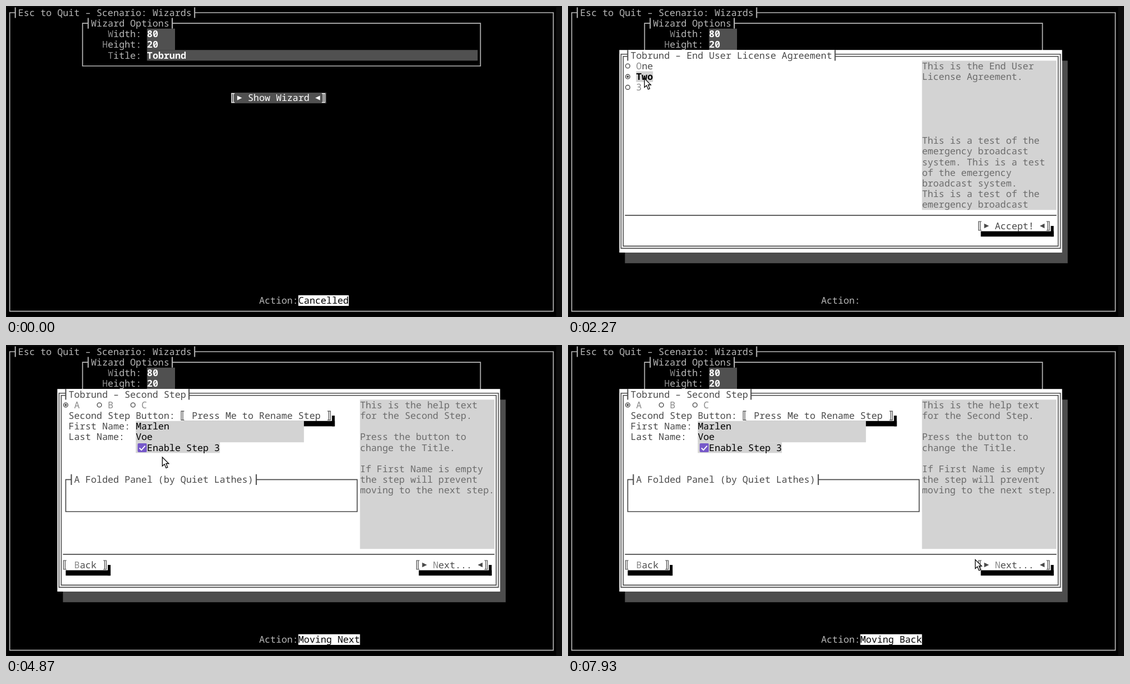
Write an HTML page that moves like this. It is 1000x560 px and loops after 8 s.

```html
<!DOCTYPE html>
<html lang="en">
<head>
<meta charset="utf-8">
<title>Wizards</title>
<style>
  html, body { margin: 0; width: 100%; height: 100%; overflow: hidden; background: #0c0c0c; }
  svg { display: block; width: 100%; height: 100%; }
  text {
    font: 500 16.8px "Noto Sans Mono", "DejaVu Sans Mono", monospace;
    white-space: pre;
    text-rendering: geometricPrecision;
    font-variant-ligatures: none;
  }
  .bold { font-weight: 700; }
</style>
</head>
<body>
<svg id="stage" viewBox="0 0 1000 560"></svg>
<script>
const LOOP = 8000, TICK = 1000 / 15;
const CELL_W = 10.08, CELL_H = 19.2;
const INK = '#4a4a4a', DIM = '#8a8a8a', PANEL = '#d3d3d3', LIGHT = '#b8b8b8', FIELD = '#505050';

// Character grid: left edge, top edge and centres of a cell.
const left = c => 1.6 + c * CELL_W;
const top_ = r => 2.4 + r * CELL_H;
const midX = c => left(c + 0.5);
const midY = r => top_(r + 0.5);

const box = (x1, y1, x2, y2, fill) =>
  `<rect x="${x1}" y="${y1}" width="${x2 - x1}" height="${y2 - y1}" fill="${fill}"/>`;
const cells = (c1, r1, c2, r2, fill) => box(left(c1), top_(r1), left(c2), top_(r2), fill);
const path = (d, color, width = 1.7) =>
  `<path d="${d}" fill="none" stroke="${color}" stroke-width="${width}"/>`;
const text = (c, r, s, color = INK, cls = '') =>
  `<text x="${left(c)}" y="${midY(r) + 5.8}" fill="${color}" class="${cls}">${s}</text>`;
const lines = (c, r, list, color) =>
  list.map((s, i) => s && text(c, r + i, s, color)).join('');

// Text whose hot key letter is dimmed.
const hot = (c, r, s, at = 0, color = INK, dim = DIM, cls = '') =>
  text(c, r, s.slice(0, at), color, cls) +
  text(c + at, r, s[at], dim) +
  text(c + at + 1, r, s.slice(at + 1), color, cls);

const focused = (c, r, s, cls) => cells(c, r, c + s.length, r + 1, PANEL) + text(c, r, s, '#000', cls);

function titleBars(c, r, title, color) {
  const bar = x => `M${midX(x)} ${top_(r)}v${CELL_H}`;
  return path(bar(c - 1) + bar(c + title.length), color, 2) + text(c, r, title, color);
}

function frame(c1, r1, c2, r2, title, color) {
  const t = c1 + 2;
  const d = `M${midX(t - 1)} ${midY(r1)}H${midX(c1)}V${midY(r2)}H${midX(c2)}V${midY(r1)}H${midX(t + title.length)}`;
  return path(d, color) + titleBars(t, r1, title, color);
}

function bracket(c, r, color, flip) {
  const x = left(c) + (flip ? 7.4 : 1), y = midY(r), s = flip ? -1 : 1;
  return path(`M${x + 5.4 * s} ${y - 8}H${x}V${y + 8}H${x + 5.4 * s}M${x + 3 * s} ${y - 8}V${y + 8}`, color, 1.2);
}

function arrow(c, r, color, flip) {
  const x = left(c) + (flip ? 8.8 : 1), y = midY(r), tip = flip ? x - 8.6 : x + 8.6;
  return `<path d="M${x} ${y - 4.2}V${y + 4.2}L${tip} ${y}Z" fill="${color}"/>`;
}

function button(c, r, label, { isDefault, pressed, color = INK, hotAt = 0, fill } = {}) {
  const pad = isDefault ? 3 : 2, end = c + label.length + 2 * pad;
  let out = '';
  if (pressed) {
    out += cells(c, r, end, r + 1, '#959595') + cells(c + pad, r, c + pad + 1, r + 1, '#c8c8c8');
  } else if (fill) {
    out += cells(c, r, end, r + 1, fill);
  } else {
    out += box(left(end), midY(r), left(end + 0.5), top_(r + 1.5), '#000') +
           box(left(c + 0.5), top_(r + 1), left(end + 0.5), top_(r + 1.5), '#000');
  }
  out += bracket(c, r, color) + bracket(end - 1, r, color, true);
  if (isDefault) out += arrow(c + 1, r, color) + arrow(end - 2, r, color, true);
  return out + (hotAt < 0 ? text(c + pad, r, label, color) : hot(c + pad, r, label, hotAt, color));
}

function radio(c, r, on) {
  const ring = `<circle cx="${midX(c)}" cy="${midY(r)}" r="3.9" fill="none" stroke="${INK}" stroke-width="1.4"/>`;
  return ring + (on ? `<circle cx="${midX(c)}" cy="${midY(r)}" r="2" fill="${INK}"/>` : '');
}

const action = s => cells(52, 27, 52 + s.length, 28, '#fff') + text(52, 27, s, '#000');
const dialogTitle = s =>
  box(midX(10), top_(4), midX(11 + s.length), top_(5), '#fff') + titleBars(11, 4, s, INK);
const help = (list, r = 5) => lines(63, r, list, '#6c6c6c');

const backdrop =
  cells(0, 0, 98, 29, '#000') +
  frame(0, 0, 97, 28, 'Esc to Quit – Scenario: Wizards', LIGHT) +
  frame(13, 1, 84, 5, 'Wizard Options', LIGHT) +
  hot(18, 2, 'Width:', 0, LIGHT) + hot(17, 3, 'Height:', 0, LIGHT) + hot(18, 4, 'Title:', 0, LIGHT) +
  cells(25, 2, 30, 4, FIELD) + cells(25, 4, 84, 5, FIELD) +
  text(25, 2, '80', '#fff', 'bold') + text(25, 3, '20', '#fff', 'bold') +
  text(25, 4, 'Tobrund', '#fff', 'bold') +
  text(45, 27, 'Action:', LIGHT);

const ring = d => {
  const x = midX(9) - d, y = midY(4) - d;
  return `M${x} ${y}H${midX(87) + d}V${midY(22) + d}H${x}Z`;
};
const dialog =
  cells(10, 5, 89, 24, '#4d4d4d') + cells(9, 4, 88, 23, '#fff') +
  path(ring(2) + ring(-2), INK, 1.6) +
  path(`M${left(10)} ${midY(19)}H${left(87)}`, INK) +
  cells(63, 5, 87, 19, PANEL);

const license =
  dialogTitle('Tobrund – End User License Agreement') +
  radio(10, 7) + text(12, 7, '3', DIM) +
  help(['This is the End User', 'License Agreement.']) +
  help(['This is a test of the', 'emergency broadcast', 'system. This is a test', 'of the emergency',
        'broadcast system.', 'This is a test of the', 'emergency broadcast'], 12);

const second =
  dialogTitle('Tobrund – Second Step') +
  radio(10, 5, true) + radio(16, 5) + radio(22, 5) +
  text(18, 5, 'B', DIM) + text(24, 5, 'C', DIM) +
  text(11, 6, 'Second Step Button:') + button(31, 6, 'Press Me to Rename Step', { hotAt: -1 }) +
  lines(11, 7, ['First Name:', 'Last Name:']) +
  cells(23, 7, 53, 9, PANEL) + lines(23, 7, ['Marlen', 'Voe'], '#000') +
  frame(10, 12, 62, 15, 'A Folded Panel (by Quiet Lathes)', INK) +
  help(['This is the help text', 'for the Second Step.', '', 'Press the button to', 'change the Title.', '',
        'If First Name is empty', 'the step will prevent', 'moving to the next step.']);

const bars = Array.from({ length: 16 }, (_, i) =>
  box(left(35 + i), top_(15), left(35 + i) + 6, top_(16), '#808080')).join('');
const third =
  dialogTitle('Tobrund – Third Step (Optional)') +
  text(10, 5, 'This step is optional.') +
  text(11, 15, 'Third Step ProgressBar:') + bars +
  help(['This is step is', 'optional', '(WizardStep.Enabled =', 'false). Enable it with', 'the checkbox in Step 2.']);

const emptyCheck = `<rect x="235.2" y="179.3" width="10.8" height="10.8" fill="none" stroke="${INK}" stroke-width="1.2"/>`;
const fullCheck = '<rect x="236.8" y="177" width="16.4" height="16" rx="2" fill="#7658c9"/>' +
  path('M240 185.5l3.6 3.6 6.6-7.4', '#fff', 1.9);
const enable = 'Enable Step 3';
const showOpts = { isDefault: true, color: '#fff', hotAt: -1, fill: FIELD };
const next = { isDefault: true };
const down = { pressed: true };
const defaultDown = { isDefault: true, pressed: true };

// Markup followed by the [from, to) spans in which it is on screen, in paint order.
const parts = [
  [backdrop, [0, LOOP]],
  [action('Cancelled'), [0, 1067]],
  [button(40, 8, 'Show Wizard', showOpts), [0, 1000]],
  [button(41, 8, 'Show Wizard', showOpts), [1000, 1067]],
  [dialog, [1067, LOOP]],
  [license, [1067, 3133]],
  [focused(12, 5, 'One') + hot(12, 6, 'Two', 0, INK, DIM, 'bold'), [1067, 2067]],
  [hot(12, 5, 'One') + focused(12, 6, 'Two', 'bold'), [2067, 3133]],
  [radio(10, 5, true) + radio(10, 6), [1067, 2133]],
  [radio(10, 5) + radio(10, 6, true), [2133, 3133]],
  [button(73, 20, 'Accept!', { isDefault: true, hotAt: -1 }), [1067, 3000]],
  [button(74, 20, 'Accept!', defaultDown), [3000, 3133]],
  [second, [3133, 6000], [7467, LOOP]],
  [focused(12, 5, 'A'), [3133, 4800]],
  [text(12, 5, 'A', DIM), [4800, 6000], [7467, LOOP]],
  [hot(25, 9, enable, 12), [3133, 4467], [5867, 6000]],
  [text(25, 9, enable, '#000'), [4467, 4800]],
  [cells(23, 9, 38, 10, PANEL) + text(25, 9, enable, '#000'), [4800, 5867], [7467, LOOP]],
  [emptyCheck, [3133, 4467]],
  [fullCheck, [4467, 6000], [7467, LOOP]],
  [third, [6000, 7467]],
  [button(10, 20, 'Back'), [3133, 7333], [7467, LOOP]],
  [button(11, 20, 'Back', down), [7333, 7467]],
  [button(73, 20, 'Next...', next), [3133, 5867], [6000, LOOP]],
  [button(74, 20, 'Next...', defaultDown), [5867, 6000]],
  [action('Moving Next'), [3133, 7467]],
  [action('Moving Back'), [7467, LOOP]],
];

const ease = {
  both: k => k * k * (3 - 2 * k),
  in: k => k ** 1.6,
  out: k => 1 - (1 - k) ** 1.6,
};

// Pointer stops: time, x, y and the easing towards that stop.
const stops = [
  [133, 629, 357], [800, 486.5, 167], [1267, 486.5, 167],
  [1933, 136.5, 122], [2200, 136.5, 122], [2267, 137, 130],
  [2733, 904, 419], [2933, 798, 396], [3267, 798, 396],
  [3733, 504, 317, 'in'], [4133, 273, 246, 'out'], [4400, 240, 185], [4733, 240, 185],
  [5533, 785, 406], [5600, 785, 406], [5800, 785, 397], [6200, 785, 397],
  [6667, 450, 334, 'in'], [7067, 151, 402, 'out'], [7133, 151, 397], [7600, 151, 397],
  [7933, 732, 386],
];

function pointerAt(t) {
  const i = stops.findIndex(s => s[0] > t);
  if (i < 0) return stops[stops.length - 1].slice(1, 3);
  if (i === 0) return null;
  const [t0, x0, y0] = stops[i - 1], [t1, x1, y1, kind = 'both'] = stops[i];
  const k = ease[kind]((t - t0) / (t1 - t0));
  return [x0 + (x1 - x0) * k, y0 + (y1 - y0) * k];
}

const stage = document.getElementById('stage');
stage.innerHTML = parts.map(p => `<g>${p[0]}</g>`).join('') +
  '<path d="M.5.5V16.5L4.3 13 7.2 20 10 18.8 7.2 12H12Z" fill="#fff" stroke="#000" stroke-width="1.3"/>';
const groups = [...stage.children];
const pointer = groups.pop();

function draw() {
  const elapsed = (performance.now() - start) % LOOP;
  // The screen refreshes fifteen times a second.
  const t = Math.round(Math.floor((elapsed + 4) / TICK) * TICK);
  parts.forEach(([, ...spans], i) => {
    groups[i].style.display = spans.some(([a, b]) => t >= a && t < b || t >= LOOP && b === LOOP) ? '' : 'none';
  });
  const at = pointerAt(t);
  pointer.style.display = at ? '' : 'none';
  if (at) pointer.setAttribute('transform', `translate(${at[0].toFixed(1)} ${at[1].toFixed(1)})`);
  requestAnimationFrame(draw);
}

const start = performance.now();
draw();
</script>
</body>
</html>
```
